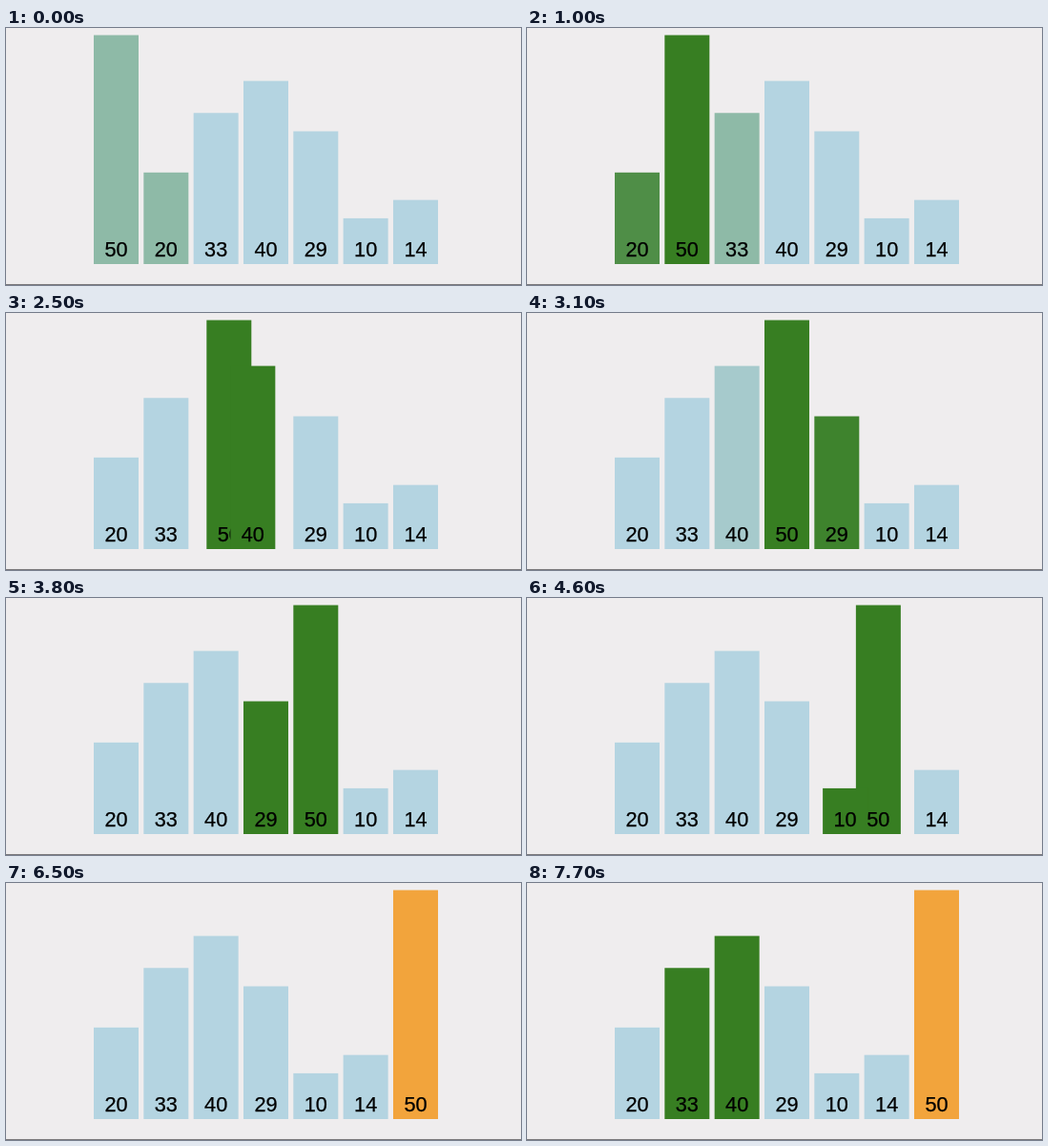
Recreate the animation shown at these times as an HTML page. Size 540 px wide and 270 px high, loop 8000 ms.

```html
<!DOCTYPE html>
<html lang="en">
<head>
<meta charset="utf-8">
<title>Bubble sort</title>
<style>
  html, body { margin: 0; width: 100%; height: 100%; overflow: hidden; background: #efedee; }
  svg { display: block; width: 100vw; height: 100vh; }
  text { font: 21.7px "Liberation Sans", Arial, sans-serif; text-anchor: middle; stroke: #000; stroke-width: 0.25px; }
</style>
</head>
<body>
<svg id="stage" viewBox="0 0 540 270">
  <rect width="540" height="270" fill="#efedee"/>
  <rect y="269" width="540" height="1" fill="#7d7b7d"/>
</svg>
<script>
const LOOP = 8000, STEP = 1000;
const LEFT = 92, PITCH = 52.33, BAR_WIDTH = 47, BASE = 248, UNIT = 4.81;
const BLUE = [180, 212, 225], GREEN = [55, 126, 34], ORANGE = [242, 164, 60];
const FADE = 300, SWAP = 400;
const FADE_IN = -126, FADE_OUT = -108, SWAP_AT = 340;
const PASS_TWO = 6874, PASS_TWO_NEXT = 7350;

const stage = document.getElementById("stage");

function add(parent, tag, attrs) {
  const node = document.createElementNS("http://www.w3.org/2000/svg", tag);
  for (const key in attrs) node.setAttribute(key, attrs[key]);
  return parent.appendChild(node);
}

const bars = [50, 20, 33, 40, 29, 10, 14].map(value => {
  const group = add(stage, "g", {});
  const height = value * UNIT;
  const rect = add(group, "rect", { y: BASE - height, width: BAR_WIDTH, height });
  add(group, "text", { x: BAR_WIDTH / 2, y: 239.5 }).textContent = value;
  return { group, rect };
});

// Cubic ease in and out, clamped to 0..1
function ease(time, start, duration) {
  const p = Math.min(1, Math.max(0, (time - start) / duration));
  return p < 0.5 ? 4 * p ** 3 : 1 - 4 * (1 - p) ** 3;
}

const fade = (time, start) => ease(time, start, FADE);
const swap = (time, k) => ease(time, k * STEP + SWAP_AT, SWAP);
const mix = (a, b, p) => a.map((v, i) => v + (b[i] - v) * p);

// The tallest bar travels right through every slot; each other bar steps left once.
function slot(i, time) {
  if (i > 0) return i - swap(time, i - 1);
  let sum = 0;
  for (let k = 0; k < bars.length - 1; k++) sum += swap(time, k);
  return sum;
}

function color(i, time) {
  if (i === 0) {
    return mix(mix(BLUE, GREEN, fade(time, FADE_IN)), ORANGE, ease(time, 5870, 500));
  }
  let green = fade(time, (i - 1) * STEP + FADE_IN) - fade(time, i * STEP + FADE_OUT);
  if (i <= 2) green += fade(time, PASS_TWO);
  if (i === 1) green -= fade(time, PASS_TWO_NEXT);
  if (i === 3) green += fade(time, PASS_TWO_NEXT);
  return mix(BLUE, GREEN, green);
}

function draw(time) {
  bars.forEach(({ group, rect }, i) => {
    group.setAttribute("transform", `translate(${LEFT + PITCH * slot(i, time)} 0)`);
    rect.setAttribute("fill", `rgb(${color(i, time).map(Math.round)})`);
  });
}

const begin = performance.now();
function tick() {
  draw((performance.now() - begin) % LOOP);
  requestAnimationFrame(tick);
}
tick();
</script>
</body>
</html>
```
